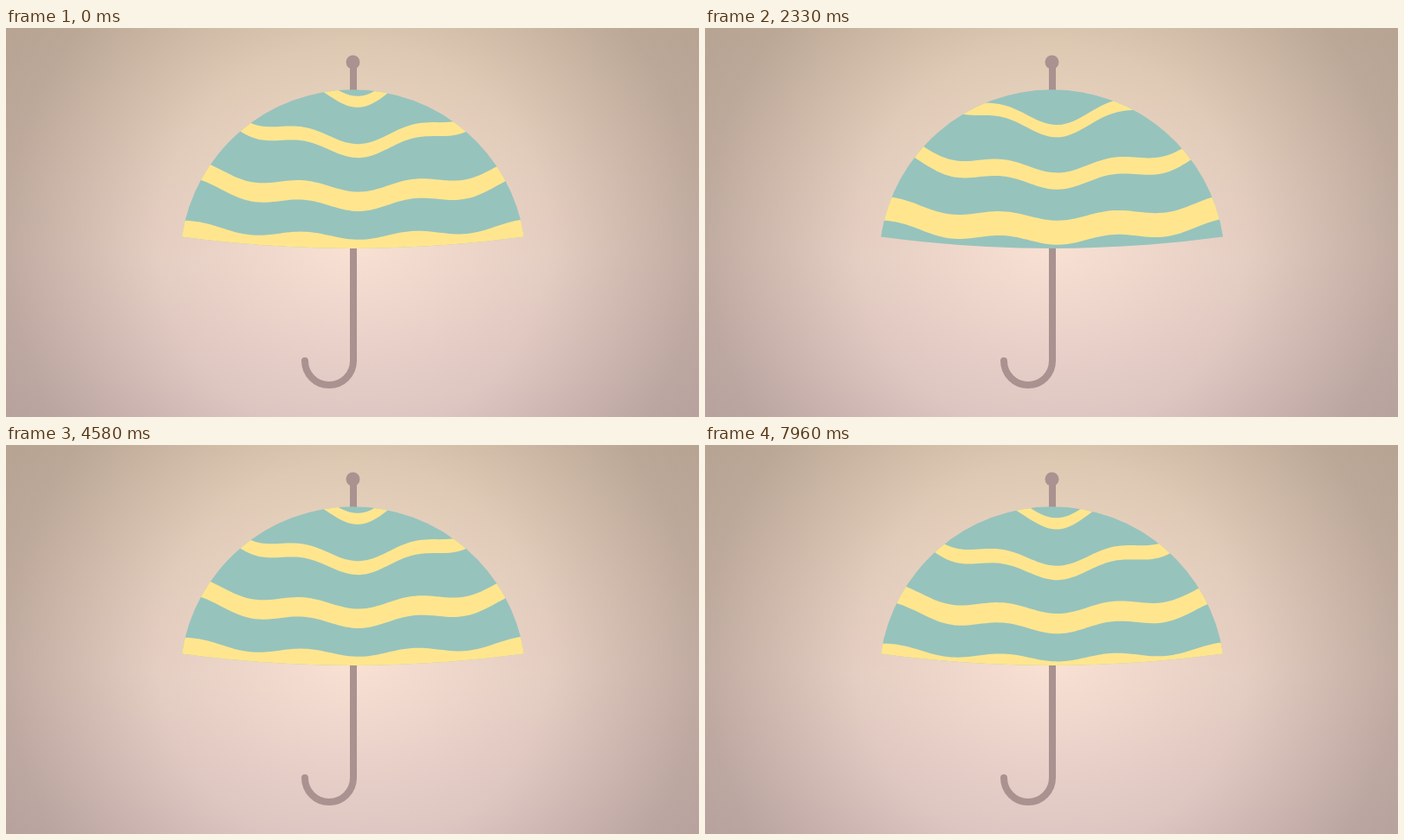
These frames come from a looping animation (800 px wide and 450 px high, 8 s). An HTML page:

```html
<!DOCTYPE html>
<html lang="en">
<head>
<meta charset="utf-8">
<title>Umbrella</title>
<style>
  html, body { margin: 0; width: 100%; height: 100%; overflow: hidden; }
  svg { display: block; width: 100vw; height: 100vh; }
</style>
</head>
<body>
<svg viewBox="0 0 800 450" preserveAspectRatio="none">
  <defs>
    <linearGradient id="tint" x2="0" y2="1">
      <stop offset="0" stop-color="#f0dbc1"/>
      <stop offset=".58" stop-color="#f9e1d4"/>
      <stop offset="1" stop-color="#f0d7d3"/>
    </linearGradient>
    <radialGradient id="shade" gradientUnits="userSpaceOnUse" cx="400" cy="245" r="460">
      <stop offset="0" stop-color="#6b5a55" stop-opacity="0"/>
      <stop offset=".49" stop-color="#6b5a55" stop-opacity=".145"/>
      <stop offset=".87" stop-color="#6b5a55" stop-opacity=".4"/>
      <stop offset="1" stop-color="#6b5a55" stop-opacity=".43"/>
    </radialGradient>
    <clipPath id="dome">
      <path d="M203 241.5A199.7 199.7 0 0 1 598 241.5Q400.5 268.5 203 241.5Z"/>
    </clipPath>
  </defs>
  <rect width="800" height="450" fill="url(#tint)"/>
  <rect width="800" height="450" fill="url(#shade)"/>
  <path d="M401 40V385A28 28 0 0 1 345 385" fill="none" stroke="#a9928f" stroke-width="8" stroke-linecap="round"/>
  <circle cx="400.5" cy="39.5" r="8" fill="#a9928f"/>
  <g clip-path="url(#dome)">
    <rect x="190" y="60" width="420" height="210" fill="#97c3bd"/>
    <path id="stripes" fill="#ffe68e"/>
  </g>
</svg>
<script>
  const LOOP = 8000, FPS = 24, STEPS = 10;
  const LEFT = 196, RIGHT = 604, GRID = 4;
  const CENTER = 400, TROUGH = 407.5, WAVELENGTH = 125;

  // pos is 0 near the tip of the canopy and 3 at its rim.
  const topDrop = pos => 79 + 55.3 * pos;
  const bottomDrop = pos => 92 + 56.5 * pos + 1.75 * pos * pos;

  // A cosine ripple on an arch; both flatten on the way down.
  function edge(drop, pos) {
    const ripple = 4 * 1.33 ** (3 - pos);
    const arch = 4 * 2.1 ** (3 - pos);
    const points = [];
    for (let x = LEFT; x <= RIGHT; x += GRID) {
      const wave = 1 - Math.cos(2 * Math.PI * (x - TROUGH) / WAVELENGTH);
      const bend = ((x - CENTER) / 100) ** 2;
      const y = drop(pos) - ripple * wave - arch * bend;
      points.push(`${x} ${y.toFixed(2)}`);
    }
    return points;
  }

  function stripe(pos) {
    const outline = [...edge(topDrop, pos), ...edge(bottomDrop, pos).reverse()];
    return `M${outline.join("L")}Z`;
  }

  const stripes = document.getElementById("stripes");
  let shown = -1;

  function draw(now) {
    // 24 steps a second, each starting on a rounded hundredth.
    const hundredths = Math.floor((now % LOOP) / 10);
    const step = Math.ceil((hundredths + 0.5) * FPS / 100) - 1;
    if (step === shown) return;
    shown = step;
    const phase = (step % STEPS) / STEPS;
    stripes.setAttribute("d", [-1, 0, 1, 2, 3].map(j => stripe(j + phase)).join(""));
  }

  const start = performance.now();
  function tick() {
    draw(performance.now() - start);
    requestAnimationFrame(tick);
  }
  tick();
</script>
</body>
</html>
```
